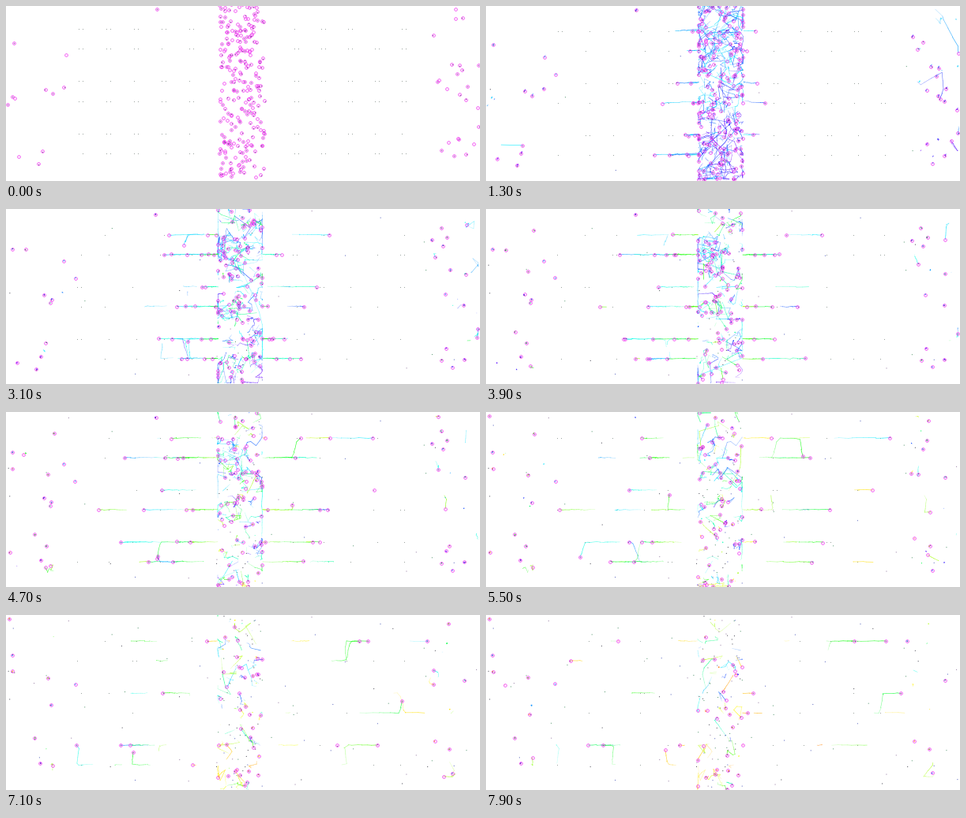
Recreate the animation shown at these times as a matplotlib script. Size 600x222 px, loop 8000 ms.

```python
import colorsys

import matplotlib.pyplot as plt
import numpy as np
from matplotlib.animation import FuncAnimation
from matplotlib.collections import LineCollection

W, H, DPI = 600, 222, 100
FRAMES, STEP_MS, TAIL = 80, 100, 14
PX = 72 / DPI
rng = np.random.default_rng(11)

ROWS = [y + gap for y in (33, 99, 165) for gap in (0, 25)]
RUNGS = {-1: 230 - 35 * np.arange(6), 1: 363 + 34 * np.arange(6)}
DOORS = {-1: 268, 1: 325}
KEY_T = [0, 13, 21, 31, 47, 63, 79]
HUE_T, HUE_V = [0, 10, 22, 40, 60, 79], [.6, .52, .42, .2, .15, .08]
cells = []  # (first, path, rgb)


def drift(frame):
    return np.array([2.2, -3.5]) * np.exp(-frame / 12)


def add(first, path):
    if first == 0:
        hue = rng.uniform(.5, .66) + .08 * (path[0][1] > 130)
    else:
        hue = np.interp(first, HUE_T, HUE_V) + rng.uniform(-.05, .05)
    path = np.array([p + drift(first + i) for i, p in enumerate(path)])
    cells.append((first, path, colorsys.hsv_to_rgb(hue, 1, 1)))


def rest(pos, n):
    return np.array(pos) + rng.normal(0, .3, (n, 2))


def walk(pos, n, lo, hi, pace):
    """Straight bits with sudden turns, sliding along the walls."""
    path = []
    angle, speed = rng.uniform(0, 2 * np.pi), pace * rng.lognormal(0, .5)
    for _ in range(n):
        path.append(pos)
        if rng.random() < .28:
            angle = rng.uniform(0, 2 * np.pi)
        move = speed * rng.choice([.1, 1, 1.8])
        step = move * np.array([np.cos(angle), np.sin(angle)])
        pos = np.clip(pos + step, lo, hi) + rng.normal(0, .2, 2)
    return np.array(path)


def run(frame, n, side):
    """Leave the middle along a row, sometimes crossing to its twin row."""
    row = rng.integers(6)
    x, speed = DOORS[side], rng.uniform(2.5, 7)
    if frame > 35 and rng.random() < .7:
        x += side * rng.uniform(10, 150)
    corners = [(x, ROWS[row])]
    for rung in RUNGS[side]:
        if (rung - x) * side > 5 and rng.random() < .22:
            corners.append((rung, ROWS[row]))
            row ^= 1
            corners.append((rung + side * rng.uniform(-4, 10), ROWS[row]))
    corners.append((RUNGS[side][-1], ROWS[row]))
    corners = np.array(corners)
    legs = np.hypot(*np.diff(corners, axis=0).T)
    far = np.r_[0, np.cumsum(legs)]
    gone = np.r_[0, np.cumsum(speed * rng.choice([.05, .7, 1.2], n - 1))]
    path = np.c_[np.interp(gone, far, corners[:, 0]),
                 np.interp(gone, far, corners[:, 1])]
    return path + rng.normal(0, .3, path.shape)


def crowd(counts, life, make):
    """Keep a population on a curve; make(frame, n) gives each path."""
    ends = []
    for f in range(FRAMES):
        ends = [e for e in ends if e > f]
        while len(ends) < round(np.interp(f, KEY_T, counts)):
            n = min(int(rng.exponential(life)) + 4, FRAMES - f)
            add(f, make(f, n))
            ends.append(f + n)


def middle(frame, n):
    lo, hi = (268, 1), (324, 221)
    pos = rng.uniform(lo, hi)
    if rng.random() > .95 - .5 * frame / FRAMES:
        return rest(pos, n)
    return walk(pos, n, lo, hi, 2.1)


def left_edge(frame, n):
    x = 90 * rng.random() ** 1.5
    if frame > 25 and rng.random() < .6:
        x = rng.normal(56, 3)
    pos = np.array([x, rng.uniform(2, 218)])
    if frame > 4 and rng.random() < .25:
        return walk(pos, n, (45, 4), (59, 215), 2)
    return rest(pos, n)


def right_edge(frame, n):
    lo, hi = (536, 4), (597, 205)
    pos = rng.uniform(lo, hi)
    return walk(pos, n, lo, hi, 1.6) if rng.random() < .2 else rest(pos, n)


crowd([235, 190, 165, 115, 75, 45, 27], 20, middle)
crowd([2, 20, 24, 25, 15, 7, 6], 18, lambda f, n: run(f, n, -1))
crowd([2, 5, 9, 13, 14, 4, 7], 18, lambda f, n: run(f, n, 1))
crowd([8, 7, 6, 8, 13, 8, 9], 28, left_edge)
crowd([22, 16, 15, 13, 11, 10, 2], 28, right_edge)
for spot in [(8, 51), (73, 66), (48, 109), (189, 7), (557, 177), (580, 191)]:
    add(0, rest(spot, FRAMES if spot[0] < 10 else 50))

# Post corners and specks of undetected cells
posts = np.array([(x + dx, y) for side in RUNGS for x in RUNGS[side][:-1]
                  for dx in (0, 5) for y in ROWS])
post_rank = rng.random(len(posts))
specks = np.r_[rng.uniform((267, 0), (325, H), (70, 2)),
               rng.uniform((0, 0), (W, H), (75, 2))]
speck_birth = 80 * rng.random(len(specks)) ** .7
tones = np.array([(.3, .3, .35), (.35, .6, .45), (.35, .4, .75), (.6, .5, .65)])
speck_rgb = tones[rng.integers(0, 4, len(specks))]

fig = plt.figure(figsize=(W / DPI, H / DPI), dpi=DPI, facecolor="white")
ax = fig.add_axes([0, 0, 1, 1])
ax.set_xlim(0, W)
ax.set_ylim(H, 0)
ax.axis("off")

post_dots = ax.scatter([], [], s=.4, color="#8a9490", linewidths=0)
speck_dots = ax.scatter([], [], s=.7, linewidths=0)
tails = LineCollection([], linewidths=.65 * PX, capstyle="round")
ax.add_collection(tails)
rings = ax.scatter([], [], s=(3.7 * PX) ** 2, linewidths=.65 * PX,
                   facecolors=(1, .6, 1, .25), edgecolors=(.93, .1, .93, .85),
                   zorder=3)
cores = ax.scatter([], [], s=(1.4 * PX) ** 2, color=(.3, .08, .45, .6),
                   linewidths=0, zorder=4)


def draw(frame):
    segs, cols, heads, dark = [], [], [], []
    for k, (first, path, rgb) in enumerate(cells):
        now = frame - first
        if now < 0:
            continue
        if now < len(path):
            heads.append(path[now])
            if k % 3:
                dark.append(path[now] + (.5 * np.sin(k), .5 * np.cos(k)))
        for i in range(max(0, now - TAIL), min(now, len(path) - 1)):
            segs.append(path[i:i + 2])
            cols.append((*rgb, .85 - .7 * (now - i - 1) / TAIL))
    tails.set_segments(segs)
    tails.set_color(cols)
    rings.set_offsets(heads)
    cores.set_offsets(dark)

    flicker = (post_rank + .37 * (frame // 4)) % 1
    shown = flicker < np.interp(frame, [0, 12, 35, 79], [.9, .6, .3, .15])
    post_dots.set_offsets(posts[shown] + drift(frame))
    born = speck_birth <= frame
    speck_dots.set_offsets(specks[born] + drift(frame))
    speck_dots.set_facecolor(speck_rgb[born])
    return tails, rings, cores, post_dots, speck_dots


anim = FuncAnimation(fig, draw, frames=FRAMES, interval=STEP_MS,
                     repeat=True, repeat_delay=0, blit=False)
plt.show()
```
